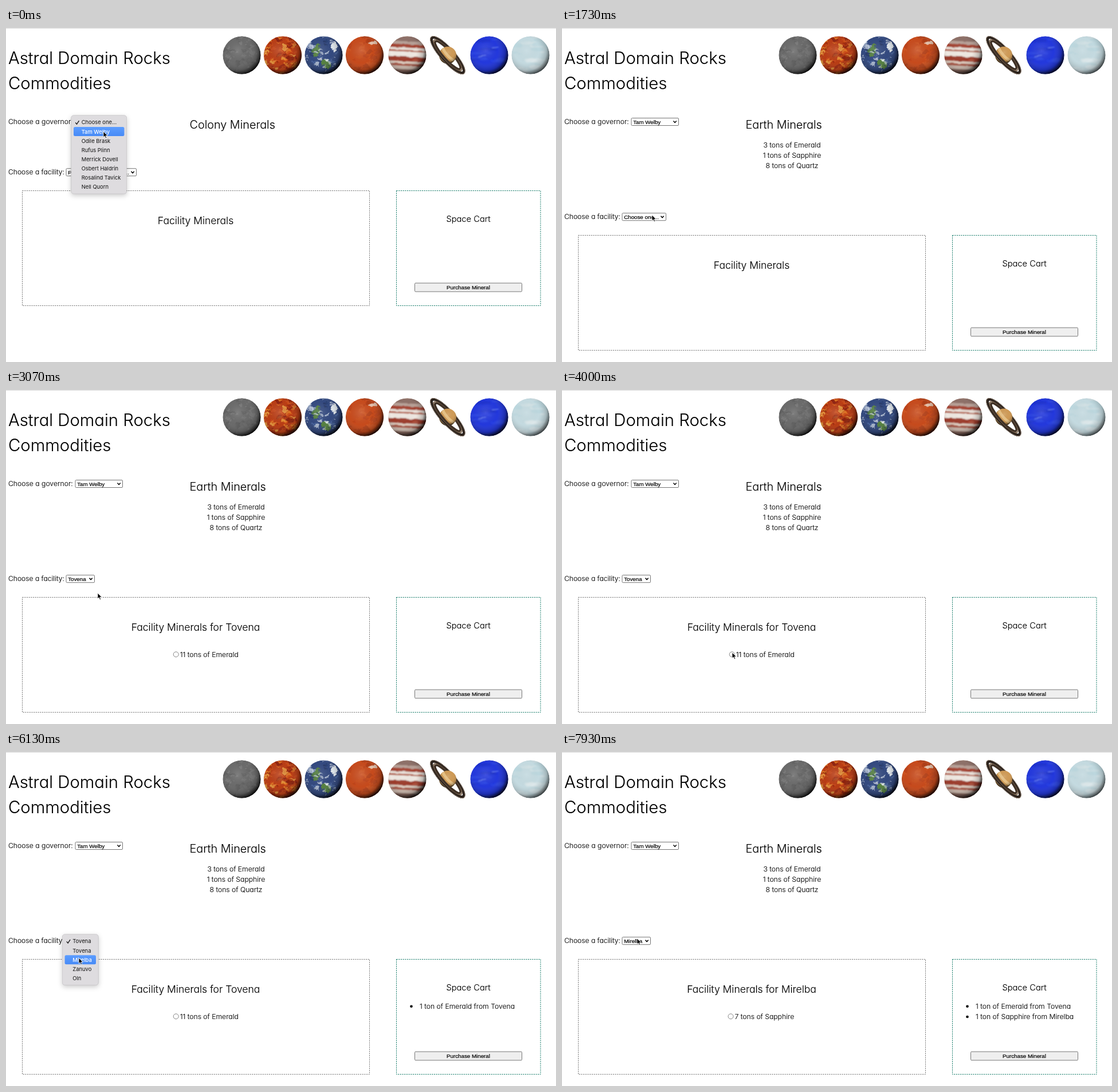
Write an HTML page that moves like this. It is 960 by 584 pixels and loops after 8000 ms.

```html
<!DOCTYPE html>
<html lang="en">
<head>
<meta charset="utf-8">
<title>Mineral market</title>
<style>
  html, body { margin: 0; width: 100%; height: 100%; overflow: hidden; background: #fff; }
  svg { display: block; width: 960px; height: 584px; }
  text { font-family: Inter, Lato, sans-serif; font-weight: 300; font-feature-settings: "cv11"; fill: #000; stroke: #000; stroke-width: .12px; white-space: pre; }
  .ui { font: 9.75px "Liberation Sans", Arial, sans-serif; stroke-width: .2px; }
  .option { font: 400 9.4px Inter, sans-serif; font-feature-settings: normal; fill: #111; stroke: none; }
  .on { fill: #fff; font-weight: 500; }
  .menu { filter: drop-shadow(0 3px 4px rgba(0,0,0,.2)); }
  .control { stroke: #767676; stroke-width: 1; }
</style>
</head>
<body>
<svg viewBox="0 0 960 584">
  <defs>
    <clipPath id="disc"><circle r="33.2"/></clipPath>
    <clipPath id="front"><rect x="-50" y="0" width="100" height="30"/></clipPath>
    <radialGradient id="shade" cx=".4" cy=".38" r=".65">
      <stop stop-color="#fff" stop-opacity=".14"/>
      <stop offset=".5" stop-color="#888" stop-opacity="0"/>
      <stop offset=".8" stop-opacity=".22"/>
      <stop offset="1" stop-opacity=".92"/>
    </radialGradient>
    <filter id="rough" x="-20%" y="-20%" width="140%" height="140%">
      <feTurbulence type="fractalNoise" baseFrequency=".13" numOctaves="4" seed="4"/>
      <feDisplacementMap in="SourceGraphic" scale="11" xChannelSelector="R" yChannelSelector="G"/>
      <feGaussianBlur stdDeviation=".6"/>
    </filter>
    <filter id="soft" x="-20%" y="-20%" width="140%" height="140%">
      <feTurbulence type="fractalNoise" baseFrequency=".08 .2" numOctaves="2" seed="2"/>
      <feDisplacementMap in="SourceGraphic" scale="3" xChannelSelector="R" yChannelSelector="G"/>
      <feGaussianBlur stdDeviation=".9"/>
    </filter>
    <linearGradient id="pick" x2="0" y2="1">
      <stop stop-color="#5c9dff"/><stop offset="1" stop-color="#478af6"/>
    </linearGradient>
  </defs>
  <path d="M0 .5H960" stroke="#dadada"/>
  <g id="planets"></g>
  <g id="page"></g>
  <path id="cursor" d="M0 0V10L2.3 7.9L3.9 11.6L5.6 10.9L4 7.3H7.2Z" stroke="#fff" stroke-width=".8"/>
</svg>
<script>
const LOOP = 8000, ROW = 16.1;
const governors = ["Tam Welby", "Odile Brask", "Rufus Plinn", "Merrick Dovell", "Osbert Haldrin", "Rosalind Tavick", "Nell Quorn"];
const facilities = ["Tovena", "Mirelba", "Zanuvo", "Oln"];
const [first, second] = facilities;
const byId = id => document.getElementById(id);

// Planets
let seed = 7;
const random = () => (seed = seed * 16807 % 2147483647) / 2147483647;

function blobs(tones, count, size, flat, opacity = .6) {
  let out = "";
  for (let i = 0; i < count; i++) {
    const r = size * (.4 + random());
    out += `<ellipse cx="${random() * 66 - 33}" cy="${random() * 66 - 33}" rx="${r}" ry="${r * flat}"
      fill="${tones[i % tones.length]}" opacity="${opacity}"/>`;
  }
  return out;
}

function planet(x, base, detail, filter = "rough", shade = 1) {
  return `<g transform="translate(${x} 47.5)" clip-path="url(#disc)"><circle r="33.2" fill="${base}"/>
    <g filter="url(#${filter})">${detail}</g><circle r="33.2" fill="url(#shade)" opacity="${shade}"/></g>`;
}

function bands() {
  const tones = ["#8d7068", "#b7a097", "#a3402e", "#e9e0d8", "#b0563f", "#efe8e1", "#9c3a29", "#dccabd", "#a5513f", "#d3c0b4", "#8b6a60"];
  const heights = [9, 5, 6, 4, 3, 9, 8, 4, 4, 6, 10];
  let y = -33;
  return `<g transform="rotate(3)">` + tones.map((tone, i) => {
    const band = `<rect x="-42" y="${y}" width="84" height="${heights[i]}" fill="${tone}"/>`;
    y += heights[i];
    return band;
  }).join("") + `</g><ellipse cx="14" cy="9" rx="5" ry="2.6" fill="#b0503a"/>`;
}

function saturn() {
  const ring = (rx, ry, color, width) =>
    `<ellipse rx="${rx}" ry="${ry}" fill="none" stroke="${color}" stroke-width="${width}"/>`;
  const rings = ring(40.5, 10.5, "#2b221c", 4.5) + ring(35.5, 8.6, "#7d6650", 2) + ring(32, 7.2, "#3f3126", 3.5) +
    ring(43.3, 12.3, "#8b7b6c", .8);
  return `<g transform="translate(771 47.5) rotate(48)">${rings}
    <circle r="15" fill="#cf9a55"/><path d="M-14-4Q0 0 14-4L15 1Q0 5-15 1Z" fill="#e6c083"/>
    <circle r="15" fill="url(#shade)"/><g clip-path="url(#front)">${rings}</g></g>`;
}

byId("planets").innerHTML =
  planet(411.5, "#6a6a6a", blobs(["#585858", "#7b7b7b", "#616161", "#858585"], 80, 3.4, .8, .5)) +
  planet(483, "#b83c14", blobs(["#e5862a", "#7d1c0c", "#eeb04a", "#d4541a", "#92240e", "#c9481a"], 110, 3.6, .6, .7)) +
  planet(554.5, "#33497f",
    `<path d="M-22-10L-12-18L-4-12L-8-3L-16 3ZM-5 9L8 7L14 13L7 25L1 24Z" fill="#55803f"/>` +
    blobs(["#e8edf2", "#22345f", "#c3d0df", "#4f6ba3", "#dfe6ee"], 75, 3.2, .5, .65) +
    `<ellipse cx="19" cy="-15" rx="7" ry="7" fill="#dfe5ea"/>`) +
  planet(626, "#c64a1c", blobs(["#d75f28", "#ac3a14", "#cf521f", "#9c3414"], 40, 5.5, .6, .4) +
    `<ellipse cx="14" cy="-22" rx="6" ry="3" fill="#e3bfa9"/>`) +
  planet(700.5, "#c9a795", bands(), "soft") + saturn() +
  planet(843.5, "#2338dc", blobs(["#2c48ea", "#1a2cc2", "#3450e8"], 22, 10, .2, .5) +
    `<path d="M-19 3L-6 1M5-13L16-14" stroke="#7d98f5" stroke-width="1.2"/>`, "soft") +
  planet(915.5, "#c4dae0", blobs(["#d8e5e8", "#b3d4dc", "#e4ecee"], 24, 10, .3, .5), "soft", .8);

// Page parts
const text = (x, y, size, value, anchor = "start") =>
  `<text x="${x}" y="${y}" font-size="${size}" text-anchor="${anchor}">${value}</text>`;
const uiText = (x, y, value, anchor = "start") =>
  `<text class="ui" x="${x}" y="${y}" text-anchor="${anchor}">${value}</text>`;

function select(x, y, width, value) {
  const end = x + width - 9;
  return `<rect class="control" x="${x}" y="${y - 6.5}" width="${width}" height="13" rx="1.5" fill="#fff"/>
    ${uiText(x + 3.2, y + 3.5, value)}
    <path d="M${end} ${y - 1.4}l2.6 2.8l2.6-2.8" fill="none" stroke="#000" stroke-width="1.5"/>`;
}

function menu(x, y, width, options, active) {
  const rows = options.map((option, i) => {
    const mid = y + 12.3 + i * ROW, on = i === active;
    return (on ? `<rect x="${x + 4.3}" y="${mid - 8}" width="${width - 8.6}" height="16" rx="2.5" fill="url(#pick)"/>` : "") +
      (i ? "" : `<path d="M${x + 7.5} ${mid + .4}l2.3 2.8l4-6" fill="none" stroke="${on ? "#fff" : "#111"}" stroke-width="1.3"/>`) +
      `<text class="option ${on ? "on" : ""}" x="${x + 18}" y="${mid + 3.4}">${option}</text>`;
  }).join("");
  return `<rect class="menu" x="${x}" y="${y}" width="${width}" height="${options.length * ROW + 8.5}" rx="4.5"
    fill="#dedcdf" stroke="#bdbbbe" stroke-width=".6"/>${rows}`;
}

const dashedBox = (x, width, color) =>
  `<rect x="${x}" y="284.5" width="${width}" height="201" fill="none" stroke="${color}" stroke-dasharray="2.2 1.5"/>`;

function draw({ colony, facility, cart, open }, active) {
  const minerals = ["3 tons of Emerald", "1 tons of Sapphire", "8 tons of Quartz"];
  const items = [`1 ton of Emerald from ${first}`, `1 ton of Sapphire from ${second}`];
  const radioX = facility === second ? 294.5 : 296.7;
  const stock = facility === second ? "7 tons of Sapphire" : "11 tons of Emerald";
  const width = !colony ? 122.5 : facility ? 49.5 : 76.5;
  const value = !colony ? "Please pick a governor..." : facility || "Choose one...";

  let out = text(4, 63, 29.3, "Astral Domain Rocks") + text(4, 107, 29.3, "Commodities") +
    text(4, 167.8, 12.2, "Choose a governor:") +
    select(121, 164, 82.5, colony ? governors[0] : "Choose one...") +
    text(320.5, 176, 19.8, colony ? "Earth Minerals" : "Colony Minerals");
  if (colony) minerals.forEach((m, i) => out += text(401.5, 208.8 + i * 18.3, 12.2, m, "middle"));

  out += `<g transform="translate(0 ${colony ? 78 : 0})">` +
    text(4, 256, 12.1, "Choose a facility:") + select(105, 252.2, width, value) +
    dashedBox(28.5, 606, "#777") + dashedBox(681.5, 251.5, "#147a68") +
    text(331, 342.7, 17.5, "Facility Minerals" + (facility ? " for " + facility : ""), "middle") +
    text(807, 338.7, 14.7, "Space Cart", "middle") +
    `<rect class="control" x="713.5" y="446" width="187" height="15" rx="1.5" fill="#efefef"/>` +
    uiText(807, 457, "Purchase Mineral", "middle");
  if (facility) out += `<circle cx="${radioX}" cy="384.3" r="4.5" fill="#fff" stroke="#767676" stroke-width=".9"/>` +
    text(radioX + 7, 389, 12.2, stock);
  items.slice(0, cart).forEach((item, i) => out +=
    `<circle cx="707.5" cy="${366.7 + i * 18.3}" r="2.3"/>` + text(722, 371 + i * 18.3, 12.2, item));
  out += "</g>";

  if (open === "governor") out += menu(113.7, 152.7, 97, ["Choose one...", ...governors], active);
  if (open === "facility") out += menu(98.3, 318.7, facility ? 63 : 91.5, [facility || "Choose one...", ...facilities], active);
  return out;
}

// Time tables
const steps = [
  [0, { colony: false, facility: "", cart: 0, open: "governor" }],
  [130, { blink: true }],
  [200, { blink: false }],
  [330, { colony: true, open: "" }],
  [1870, { open: "facility" }],
  [2560, { blink: true }],
  [2640, { blink: false }],
  [2770, { facility: first, open: "" }],
  [4170, { cart: 1 }],
  [5080, { open: "facility" }],
  [6190, { blink: true }],
  [6260, { blink: false }],
  [6390, { facility: second, open: "" }],
  [7220, { cart: 2 }]
];
const path = [
  [0, 170, 181], [930, 170, 181], [1530, 157, 327], [1900, 157, 327], [2300, 152, 349],
  [2950, 152, 349], [3800, 297, 459], [4350, 297, 459], [4980, 121, 327], [5350, 121, 327],
  [5950, 127, 360], [6450, 127, 360], [7050, 295, 459], [7320, 295, 459], [7860, 131, 324],
  [7930, 131, 326], [8000, 131, 326]
];

function cursorAt(t) {
  const i = path.findIndex(p => p[0] > t);
  const [t0, x0, y0] = path[i - 1], [t1, x1, y1] = path[i];
  const k = (t - t0) / (t1 - t0), ease = k * k * (3 - 2 * k);
  return [x0 + (x1 - x0) * ease, y0 + (y1 - y0) * ease];
}

let shown = "";
function frame(now) {
  const t = Math.max(0, now) % LOOP;
  const state = Object.assign({}, ...steps.filter(s => s[0] <= t).map(s => s[1]));
  const [x, y] = cursorAt(t);
  const top = state.open === "governor" ? 157 : 323;
  const active = state.open && !state.blink ? Math.floor((y - top) / ROW) : -1;
  const key = JSON.stringify([state, active]);
  if (key !== shown) {
    byId("page").innerHTML = draw(state, active);
    shown = key;
  }
  byId("cursor").setAttribute("transform", `translate(${x} ${y})`);
}

const start = performance.now();
function tick() {
  frame(performance.now() - start);
  requestAnimationFrame(tick);
}
tick();
</script>
</body>
</html>
```
